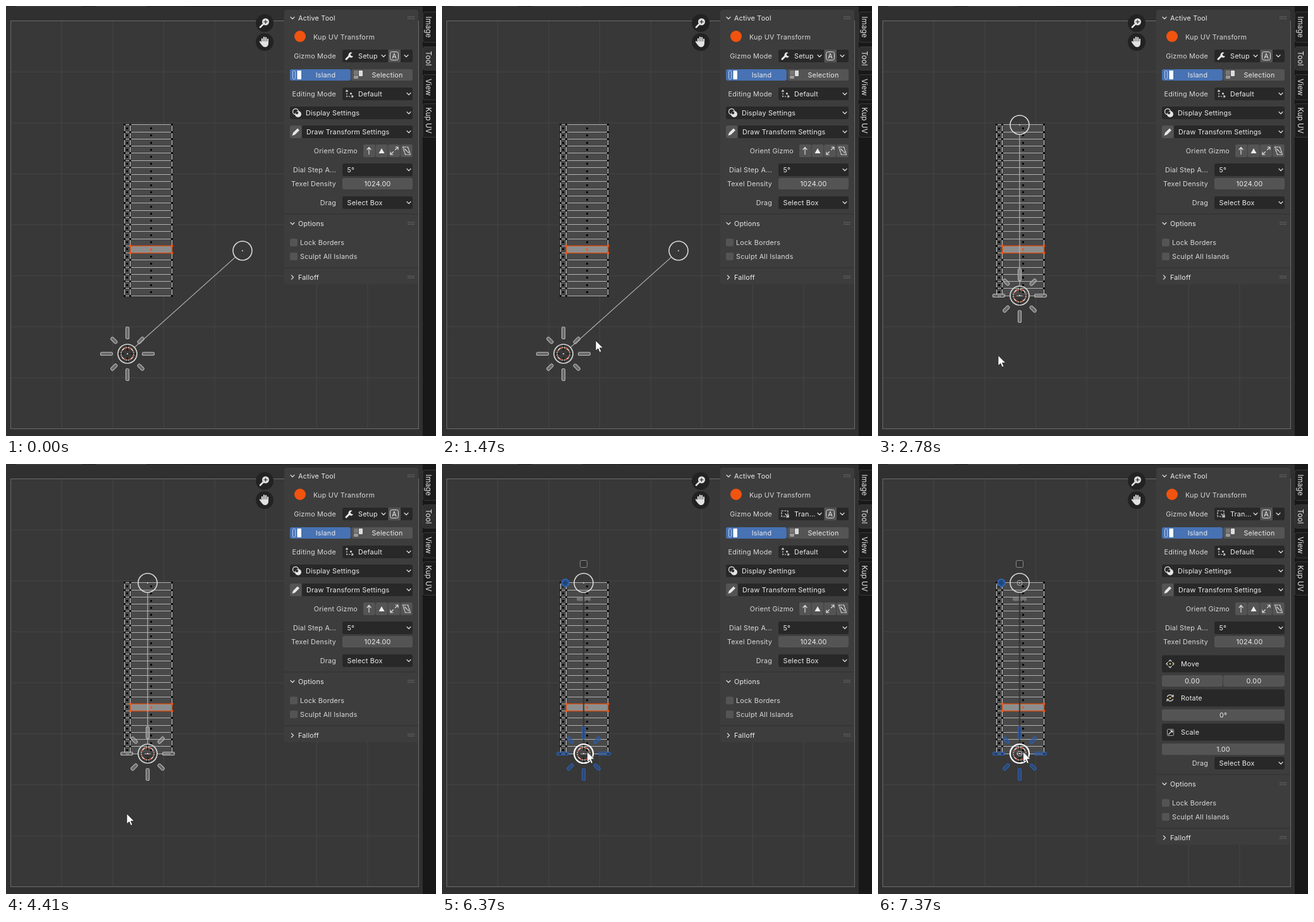
An HTML page that plays this animation: 680x680 px, repeating every 7990 ms.

```html
<!DOCTYPE html>
<html lang="en">
<head>
<meta charset="utf-8">
<title>UV transform gizmo</title>
<style>
html, body { margin: 0; width: 100%; height: 100%; overflow: hidden; background: #303030; }
svg { display: block; width: 100vw; height: 100vh; }
text { font: 10.8px Inter, "Open Sans", sans-serif; letter-spacing: .2px; fill: #ececec; }
.dim { fill: #d8d8d8; }
.tab { font-size: 11.3px; }
.ico { fill: none; stroke: #dcdcdc; stroke-width: 1.2; stroke-linecap: round; stroke-linejoin: round; }
#rows { shape-rendering: crispEdges; }
</style>
</head>
<body>
<svg id="stage" viewBox="0 0 680 680"></svg>
<script>
const DARK = '#282828', MID = '#545454', BLUE = '#4772b3', ORANGE = '#f2530f';
const LOOP = 7990;

const rect = (x, y, w, h, fill, r = 0, more = '') =>
  `<rect x="${x}" y="${y}" width="${w}" height="${h}" rx="${r}" fill="${fill}" ${more}/>`;
const circle = (x, y, r, fill, more = '') =>
  `<circle cx="${x}" cy="${y}" r="${r}" fill="${fill}" ${more}/>`;
const line = (x1, y1, x2, y2, color, w = 1, more = '') =>
  `<path d="M${x1} ${y1}L${x2} ${y2}" stroke="${color}" stroke-width="${w}" ${more}/>`;
const text = (s, x, y, anchor = 'start', cls = '') =>
  `<text x="${x}" y="${y + 4}" text-anchor="${anchor}" class="${cls}">${s}</text>`;
const icon = (d, x, y, more = '') =>
  `<path class="ico" d="${d}" transform="translate(${x} ${y})" ${more}/>`;
const group = (id, body, hidden) =>
  `<g id="${id}"${hidden ? ' visibility="hidden"' : ''}>${body}</g>`;
const range = (n, f) => Array.from({ length: n }, (_, i) => f(i)).join('');

const down = (x, y) => icon('M-3 -1.5L0 1.5 3 -1.5', x, y);
const label = (s, x, y) => text(s, x, y, 'end', 'dim');
const drop = (x, y, w, s, tx) => rect(x, y - 10, w, 20, DARK, 3) + text(s, tx, y) + down(x + w - 6, y);
const field = (x, y, w, s) => rect(x, y - 9, w, 18, MID, 3) + text(s, x + w / 2, y, 'middle');
const grip = y => range(8, i => rect(635.5 + (i % 4) * 2.9, y - 2 + (i >> 2) * 3, 1.2, 1.2, '#8a8a8a'));

function backdrop() {
  const step = 645 / 8;
  return rect(0, 0, 680, 680, '#303030') + rect(0, 0, 659, 1, '#262626') +
    rect(15, 0, 105, 1, '#444') + rect(143, 0, 79, 1, '#444') + rect(284, 0, 375, 1, '#1e1e1e') +
    rect(7.5, 23.5, 645, 645, '#383838') +
    range(7, i => {
      const d = (i + 1) * step;
      return line(7.5 + d, 23.5, 7.5 + d, 668.5, '#454545') + line(7.5, 23.5 + d, 652.5, 23.5 + d, '#454545');
    }) +
    rect(7.5, 23.5, 645, 645, 'none', 0, 'stroke="#6c6c6c"');
}

function strip() {
  const x0 = 187.5, x1 = 196.5, x2 = 262.5, top = 187.9, rows = 24, h = 11.26, sel = 17;
  const dot = (x, y, c = '#050505', s = 3) => rect(x - s / 2, y - s / 2, s, s, c);
  const xs = [x0, x1, x2], ys = top + sel * h;
  return group('rows',
    rect(x0, top, x2 - x0, rows * h, '#494949') +
    xs.map(x => line(x, top, x, top + rows * h, '#c8c8c8')).join('') +
    range(rows + 1, i => line(x0, top + i * h, x2, top + i * h, '#b2b2b2')) +
    range(rows + 1, i => xs.map(x => dot(x, top + i * h)).join('')) +
    range(rows, i => dot(191.5, top + (i + .5) * h) + dot(229.5, top + (i + .5) * h))) +
    rect(x1, ys, x2 - x1, h, '#8e8e8e', 0, 'stroke="#dd4f12" stroke-width="1.4"') +
    [[x1, ys], [x2, ys], [x1, ys + h], [x2, ys + h]].map(p => dot(...p, ORANGE, 3.4)).join('') +
    dot(229.5, ys + h / 2, ORANGE);
}

function dial() {
  const spoke = a => {
    const len = a % 90 ? 12 : 19, dist = a % 90 ? 30 : 33;
    return `<rect x="${dist - len / 2}" y="-2.5" width="${len}" height="5" rx="2" transform="rotate(${a})"/>`;
  };
  const arm = a => `<g transform="rotate(${a})">${line(5, 0, 15, 0, '#111', 1.2)}</g>`;
  return group('spokes', range(8, i => spoke(i * 45))) +
    circle(0, 0, 10, 'none', 'stroke="#f0f0f0" stroke-width="1.3"') +
    circle(0, 0, 10, 'none', 'stroke="#e0401c" stroke-width="1.3" stroke-dasharray="3.93" transform="rotate(11)"') +
    [0, 90, 180, 270].map(arm).join('') +
    circle(0, 0, 15, 'none', 'id="ring"') +
    circle(0, 0, 1, '#eee');
}

function handles() {
  return group('extras',
    rect(218.5, 152.5, 11, 11, '#333', 2, 'stroke="#8c8c8c"') +
    circle(195, 188, 6, '#2b5288', 'stroke="#2f69bd" stroke-width="1.4"') +
    line(191, 188, 199, 188, '#17355f') + line(195, 184, 195, 192, '#17355f') +
    rect(213, 210.5, 22, 6, '#858585', 2.5, 'opacity=".7"'), true) +
    '<path id="link"/>' +
    group('knob', circle(0, 0, 15, 'none', 'stroke="#d8d8d8" stroke-width="1.6"') + circle(0, 0, 1, '#ddd')) +
    group('dial', dial()) +
    group('pins', [188, 458].map(y => circle(224, y, 4, 'none', 'stroke="#b4b4b4"')).join(''), true);
}

function navButtons() {
  return circle(409, 27, 14, '#222') + circle(409, 57, 14, '#222') +
    circle(410.5, 25, 5.5, '#e2e2e2') + line(406.5, 29, 402, 33.5, '#e2e2e2', 2.6, 'stroke-linecap="round"') +
    line(407.5, 25, 413.5, 25, '#333', 1.3) + line(410.5, 22, 410.5, 28, '#333', 1.3) +
    '<path d="M405 57V52M408 56V49.5M411 56V50M414 57V52.5M404.5 60L402 56.5" stroke="#e2e2e2" stroke-width="2.2" stroke-linecap="round"/>' +
    '<path d="M404 56H415V60Q414 65 409.5 65 406.5 65 404 61Z" fill="#e2e2e2"/>';
}

function tabs() {
  const tab = (s, y, h, on) => rect(659, y, 24, h, on ? '#303030' : '#1d1d1d', 4, 'stroke="#3a3a3a"') +
    `<text class="tab" text-anchor="middle" transform="translate(663.5 ${y + h / 2}) rotate(90)">${s}</text>`;
  return rect(659, 0, 21, 680, '#181818') + tab('Image', 9.5, 48) + tab('Tool', 64.5, 37, true) +
    tab('View', 108.5, 40) + tab('Kup UV', 154.5, 53);
}

function modeIcons() {
  const wrench = '<path d="M538 84L543.5 78.5" stroke="#e8e8e8" stroke-width="3" stroke-linecap="round"/>' +
    '<path d="M547.5 74A4 4 0 1 0 549 79.5L546 79 544.5 76.5Z" fill="#e8e8e8"/>';
  const box = icon('M-6 -5H4V4H-6Z', 543, 79, 'stroke-dasharray="2.5 2.2"') + icon('M0 0L5 5M1.5 5H5V1.5', 543, 79);
  return group('setup', wrench + text('Setup', 557, 79)) + group('trans', box + text('Tran...', 557, 79), true);
}

function upperPanel() {
  const cell = x => rect(x - 9.3, 219, 18.8, 20, MID, 2);
  return down(453, 19) + text('Active Tool', 462, 19) + grip(18.5) +
    circle(465, 48, 9, ORANGE) + text('Kup UV Transform', 486, 49, 'start', 'dim') +
    label('Gizmo Mode', 522, 79) + rect(532, 69, 111, 20, DARK, 3) + rect(604.5, 69, 19.5, 20, MID) +
    modeIcons() + down(597, 79) + down(633, 79) +
    rect(607.5, 72.5, 13, 13, 'none', 3, 'stroke="#ddd"') + text('A', 614, 79, 'middle') +
    rect(449, 100, 96, 18, BLUE, 3) + rect(546, 100, 97, 18, MID, 3) +
    rect(453.5, 102.5, 4, 13, 'none', 1, 'stroke="#b9d0f2"') + rect(460.5, 102, 6.5, 14, '#fff', 1) +
    text('Island', 505.5, 109, 'middle') + text('Selection', 603, 109, 'middle') +
    rect(550, 102, 7, 7, '#777', 1) + rect(558, 102, 6, 9, '#ddd', 1) + rect(550, 110, 7, 5, '#999', 1) +
    label('Editing Mode', 522, 139) + drop(532, 139, 111, 'Default', 557) +
    icon('M-4 -5V4H5', 543, 139, 'stroke-dasharray="1.5 2.6"') +
    icon('M-5.5 -4L-4 -6 -2.5 -4M4 2.5L6 4 4 5.5M-4.5 4H-3.5', 543, 139) + circle(545.5, 138.5, 1.5, '#ddd') +
    drop(449, 169, 194, 'Display Settings', 474) +
    circle(458, 167, 4.5, 'none', 'stroke="#ddd" stroke-width="1.3"') + circle(462, 171, 5, '#e4e4e4') +
    circle(460, 169, 2.3, '#333') +
    drop(468, 199, 175, 'Draw Transform Settings', 475) + rect(449, 189, 18.5, 20, MID, 3) +
    '<path d="M452.5 205L454 200.5 461 193.5 464 196.5 457 203.5Z" fill="#e8e8e8"/>' +
    label('Orient Gizmo', 556, 229) + [574.3, 593.9, 613.5, 633.1].map(cell).join('') +
    icon('M0 5.5V-5M-3 -2L0 -5.5 3 -2', 574, 229) + '<path d="M589.5 233L594 225 598.5 233Z" fill="#eee"/>' +
    icon('M-5.5 5.5L-1.5 1.5M1.5 -1.5L5.5 -5.5M-6 2V6H-2M2 -6H6V-2', 614, 229) +
    icon('M-6 -6H2L6 6H-2L-6 -6M-3 -3L3 3', 633.5, 229, 'stroke-dasharray="5 1.5"') +
    label('Dial Step A...', 522, 259) + drop(532, 259, 111, '5°', 539.5) +
    label('Texel Density', 522, 281) + field(532, 281, 111, '1024.00');
}

function extraPanel() {
  const head = (s, y) => rect(449, y - 13.5, 194, 27, DARK, 3) + text(s, 479, y);
  return head('Move', 316) + field(449, 343, 96, '0.00') + field(546, 343, 97, '0.00') +
    head('Rotate', 370) + field(449, 397, 194, '0°') + head('Scale', 424) + field(449, 451, 194, '1.00') +
    icon('M-2 -4L0 -6 2 -4M-2 4L0 6 2 4M-4 -2L-6 0 -4 2M4 -2L6 0 4 2', 462, 316) + circle(462, 316, 1.3, '#e6c84a') +
    icon('M-4.5 -2A5 5 0 0 1 4.5 -2M4.5 2A5 5 0 0 1 -4.5 2M5 -5V-2H2M-5 5V2H-2', 462, 370) +
    circle(462, 370, 1.3, '#e6c84a') +
    rect(457.5, 419.5, 10, 10, 'none', 1, 'stroke="#aaa"') + icon('M-3 3L3 -3M0 -3H3V0', 462.5, 424.5);
}

function lowerPanel() {
  const check = (s, y) => rect(449, y - 6, 12, 12, MID, 2) + text(s, 465, y, 'start', 'dim');
  const gap = y => rect(440, y, 212, 2, '#363636');
  return label('Drag', 522, 311) + drop(532, 311, 111, 'Select Box', 539.5) + gap(328) +
    down(453, 344) + text('Options', 462, 344) + grip(343.5) +
    check('Lock Borders', 374) + check('Sculpt All Islands', 396) + gap(413) +
    icon('M-1.5 -3L1.5 0 -1.5 3', 453, 429) + text('Falloff', 462, 429) + grip(428.5);
}

const arrow = '<path d="M0 0V16.3L3.8 12.8 6.3 18.6 9 17.4 6.5 11.8H11.8Z" fill="#fff" stroke="#1a1a1a" stroke-width=".8"/>';

document.getElementById('stage').innerHTML = backdrop() + strip() + handles() + navButtons() +
  rect(440, 6, 212, 434, '#3d3d3d', 4, 'id="panel"') + upperPanel() +
  group('extra', extraPanel(), true) + group('lower', lowerPanel()) + tabs() +
  circle(0, 0, 13, '#d8cc10', 'id="click" fill-opacity=".72"') + group('pointer', arrow, true);

const el = {};
for (const id of ['spokes', 'ring', 'extras', 'link', 'knob', 'dial', 'pins', 'setup', 'trans', 'panel', 'extra', 'lower', 'click', 'pointer'])
  el[id] = document.getElementById(id);

// Pointer moves: start time, then one x,y pair every 80 ms.
const moves = [
  [610, [[653, 500], [505, 394], [385, 323.5]]],
  [1070, [[382, 313], [371, 309], [346, 346], [311, 416], [273, 490], [243, 529], [221, 545], [204, 552], [194, 553], [190, 552.5]]],
  [4410, [[191, 553], [196, 550], [208, 543], [224, 535], [240, 529], [252, 525.5], [258.5, 524.5]]],
  [5120, [[263, 522], [271, 518], [276, 516]]],
  [5740, [[272, 511], [262, 500], [250, 485], [240, 470], [233, 459], [230, 456]]],
  [6370, [[229.5, 455]]]
];

function pointerAt(t) {
  const move = moves.filter(m => m[0] <= t).pop();
  return move && move[1][Math.min(move[1].length - 1, Math.floor((t - move[0]) / 80))];
}

const within = (t, a, b) => t >= a && t < b;
const show = (node, on) => node.setAttribute('visibility', on ? 'visible' : 'hidden');
const place = (node, x, y) => node.setAttribute('transform', `translate(${x} ${y})`);
const paint = (node, attrs) => { for (const k in attrs) node.setAttribute(k, attrs[k]); };

function draw(t) {
  const p = pointerAt(t), snapped = t >= 2680, trans = t >= 5200, open = t >= 7290;
  const [cx, cy, kx, ky] = snapped ? [224, 458, 224, 188] : [192, 550, 374, 387];
  const len = Math.hypot(kx - cx, ky - cy), ux = (kx - cx) / len * 15.5, uy = (ky - cy) / len * 15.5;

  place(el.dial, cx, cy);
  place(el.knob, kx, ky);
  paint(el.link, {
    d: `M${cx + ux} ${cy + uy}L${kx - ux} ${ky - uy}`,
    stroke: trans ? '#333' : '#b4b4b4', 'stroke-width': trans ? 2.4 : 1.2, 'stroke-opacity': trans ? .8 : 1
  });
  paint(el.spokes, {
    fill: trans ? '#2b559a' : '#8c8c8c', stroke: trans ? '#2b64b8' : '#bcbcbc',
    'fill-opacity': .6, 'stroke-opacity': .9, 'stroke-width': 1.2
  });

  const hover = p && Math.hypot(p[0] - cx, p[1] - cy) < 13;
  paint(el.ring, { stroke: hover ? '#fff' : '#d6d6d6', 'stroke-width': hover ? 2.2 : 1.7 });

  show(el.extras, trans);
  show(el.setup, !trans);
  show(el.trans, trans);
  show(el.extra, open);
  show(el.pins, open);
  place(el.lower, 0, open ? 162 : 0);
  el.panel.setAttribute('height', open ? 596 : 434);

  show(el.pointer, p);
  show(el.click, within(t, 2480, 2580) || within(t, 2680, 2780) || within(t, 7210, 7370));
  if (p) {
    place(el.pointer, ...p);
    place(el.click, p[0], p[1] - 2);
  }
}

const start = performance.now();
function tick() {
  draw((performance.now() - start) % LOOP);
  requestAnimationFrame(tick);
}
tick();
</script>
</body>
</html>
```
